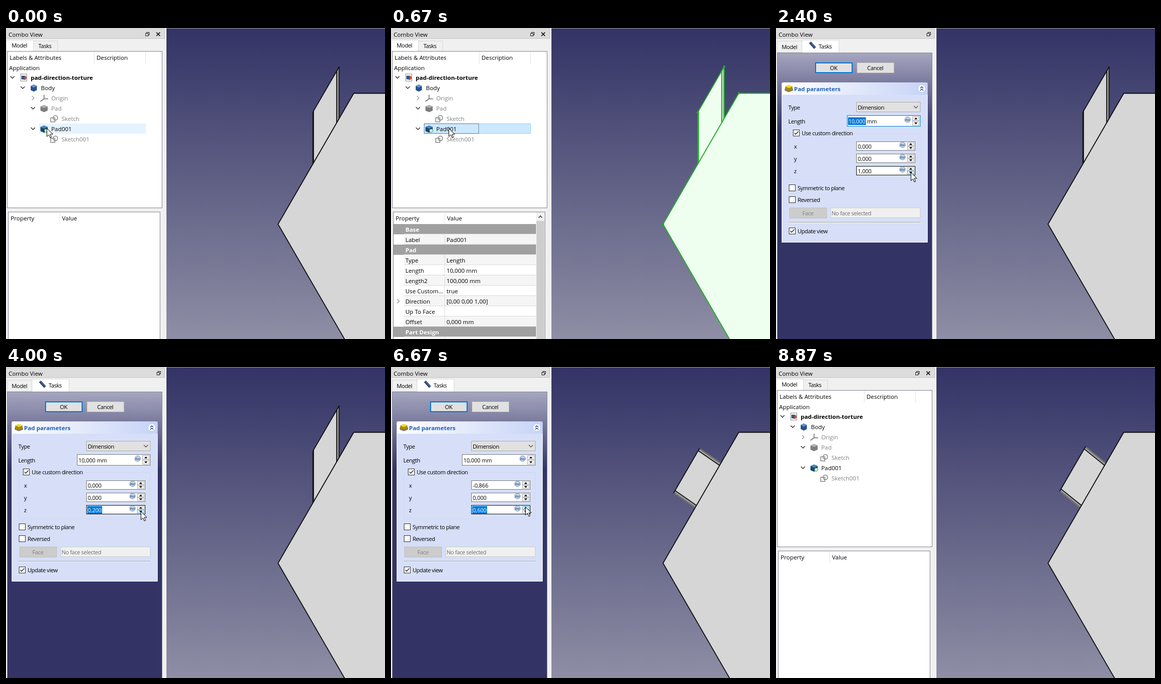
These frames come from a looping animation (737 by 606 pixels, 8.99 s). An HTML page with a canvas:

```html
<!DOCTYPE html>
<html lang="en">
<head>
<meta charset="utf-8">
<title>Pad direction</title>
<style>
html, body { margin: 0; width: 100%; height: 100%; overflow: hidden; background: #f0f0f0; }
canvas { display: block; }
</style>
</head>
<body>
<canvas id="stage" width="737" height="606"></canvas>
<script>
const c = document.getElementById('stage').getContext('2d');
const LOOP = 8990, BLUE = '#0078d7', GRAY = '#808080', PALE = '#d6dff7';
const UI = '11.4px "Open Sans", sans-serif', BOLD = 'bold ' + UI;
const SMALL = '11px "Open Sans", sans-serif', NUM = '10.6px "Open Sans", sans-serif';

// Moments when the picture changes
const SELECT = 470, EDIT = 800, STEP_DOWN = 2470, TILT = 4600, STEP_UP = 5600,
  RAISE = 6130, STEP_UP_2 = 6730, RAISE_2 = 7200, CLOSE = 8200, BLUR = 8870;

// ---------- Helpers ----------

function rect(x, y, w, h, fill) { c.fillStyle = fill; c.fillRect(x, y, w, h); }

function box(x, y, w, h, fill, border, width = 1) {
  rect(x, y, w, h, border);
  rect(x + width, y + width, w - 2 * width, h - 2 * width, fill);
}

function text(str, x, y, color = '#000', font = UI, align = 'left') {
  c.font = font;
  c.letterSpacing = font === SMALL ? '-0.45px' : '0px';
  c.textAlign = align;
  c.fillStyle = color;
  c.fillText(str, x, y);
}

const small = (str, x, y, color, align) => text(str, x, y, color, SMALL, align);

function trace(points, close) {
  c.beginPath();
  points.forEach(([x, y]) => c.lineTo(x, y));
  if (close) c.closePath();
}

function line(points, color = '#000', width = 1) {
  trace(points);
  c.strokeStyle = color;
  c.lineWidth = width;
  c.stroke();
}

function poly(points, fill) { trace(points, true); c.fillStyle = fill; c.fill(); }

function circle(x, y, r, fill, border, width = 1) {
  c.beginPath();
  c.arc(x, y, r, 0, 7);
  if (fill) { c.fillStyle = fill; c.fill(); }
  if (border) { c.strokeStyle = border; c.lineWidth = width; c.stroke(); }
}

function ramp(x0, y0, x1, y1, ...colors) {
  const g = c.createLinearGradient(x0, y0, x1, y1);
  colors.forEach((col, i) => g.addColorStop(i / (colors.length - 1), col));
  return g;
}

// Chevron pointing along (dx, dy)
function chevron(x, y, dx, dy, color, s = 4, width = 1.4) {
  const h = s / 2;
  line([[x - dx * h - dy * s, y - dy * h - dx * s], [x + dx * h, y + dy * h],
    [x - dx * h + dy * s, y - dy * h + dx * s]], color, width);
}

// Small isometric block
function block(x, y, r, h, side, top) {
  poly([[x - r, y - h], [x, y - h - 3], [x + r, y - h], [x + r, y + h], [x, y + h + 3], [x - r, y + h]], side);
  poly([[x - r, y - h], [x, y - h - 3], [x + r, y - h], [x, y - h + 3]], top);
}

// ---------- 3D view ----------

const HEX = { x: 823.5, y: 382.3, r: 294.5 };

function drawView(t) {
  rect(312, 0, 425, 1, '#a0a0a0');
  rect(312, 1, 425, 605, ramp(0, 1, 0, 606, '#333366', '#8e8ea5'));
  const picked = t >= SELECT && t < EDIT;
  const face = picked ? '#eefff0' : '#d6d6d6';
  const ink = picked ? '#1fae24' : '#101014';
  const tilted = t >= TILT;
  const z = t < RAISE ? 0.5 : t < RAISE_2 ? 0.6 : 0.7;

  // The pad keeps its height along the sketch normal, whatever the direction
  const dir = tilted ? [-0.866, -z] : [0, -1];
  const k = 50.5 / -(dir[0] * 0.866 + dir[1] * 0.5);
  const along = s => [HEX.x - HEX.r + s * 0.5, HEX.y - s * 0.866];
  const base = (tilted ? [226, 220, 130, 124] : [238, 228, 138, 135]).map(along);
  const top = base.map(([x, y]) => [x + dir[0] * k, y + dir[1] * k]);

  poly([...top, ...base.slice().reverse()], face);

  // Rounded sides, shaded across the extrusion
  const len = Math.hypot(...dir), n = [-dir[1] / len, dir[0] / len];
  for (const [inner, outer] of [[1, 0], [2, 3]]) {
    const [px, py] = base[inner], [qx, qy] = base[outer];
    const d = (qx - px) * n[0] + (qy - py) * n[1];
    poly([top[outer], top[inner], base[inner], base[outer]], ramp(px, py, px + n[0] * d, py + n[1] * d,
      ...(picked ? ['#d8f6d8', '#6cc06e'] : ['#c8c8c4', '#58585a'])));
    line([base[inner], top[inner]], ink, 1.8);
    if (!tilted) line([base[outer], top[outer]], ink, 1.4);
  }
  line([top[0], top[3]], ink, 1.8);

  const hex = Array.from({ length: 6 }, (_, i) => {
    const a = i * Math.PI / 3;
    return [HEX.x + HEX.r * Math.cos(a), HEX.y + HEX.r * Math.sin(a)];
  });
  poly(hex, face);
  line([...hex, hex[0]], ink, 1.8);
  if (picked) [hex[3], hex[4], top[0], top[3]].forEach(p => circle(...p, 2.2, ink));
}

// ---------- Title and tabs ----------

function drawFrame(tasks) {
  rect(0, 0, 312, 606, '#f0f0f0');
  box(-1, 1, 310, 20, '#dcdcdc', '#c4c4c4');
  text('Combo View', 5, 17);
  const x = tasks ? 293 : 271;
  box(x + 2, 8, 6, 6, '#dcdcdc', '#222');
  box(x, 10, 6, 6, '#dcdcdc', '#222');
  if (tasks) {
    box(2, 25, 49, 23, '#f0f0f0', '#d9d9d9');
    box(50, 23, 73, 26, '#fff', '#d9d9d9');
    line([[66, 28], [76, 39]], '#2c4676', 5);
    line([[67, 28], [77, 39]], '#6d8fc2', 1);
    small('Model', 11, 41);
    small('Tasks', 83, 40);
  } else {
    for (const d of [-3.5, 3.5]) line([[296 - d, 8.5], [296 + d, 15.5]], '#111', 1.7);
    box(53, 25, 48, 21, '#f0f0f0', '#d9d9d9');
    box(0, 23, 54, 24, '#fff', '#d9d9d9');
    small('Model', 11, 38);
    small('Tasks', 63, 39);
  }
}

// ---------- Model tab ----------

const ICONS = {
  page(x, y) {
    box(x - 6, y - 8, 13, 15, '#f4f4f4', '#999');
    circle(x + 2, y, 4, '#d0512c');
    rect(x - 4, y - 4, 6, 7, '#2f5790');
  },
  body(x, y) { block(x, y, 6, 4, '#28538c', '#6796cd'); },
  axes(x, y) {
    line([[x, y - 7], [x, y + 1], [x - 7, y + 6]], '#777', 1.6);
    line([[x, y + 1], [x + 8, y + 1]], '#777', 1.6);
  },
  pad(x, y) { block(x, y, 7, 4, '#7d7d7d', '#b0b0b0'); },
  tip(x, y) {
    block(x, y, 7, 4, '#1d4479', '#4f86c6');
    circle(x + 4, y + 3, 3.2, '#eafbe8', '#20b02c');
  },
  sketch(x, y) {
    c.strokeStyle = GRAY;
    c.lineWidth = 1.4;
    c.strokeRect(x - 7, y - 2, 8, 8);
    circle(x + 2, y - 2, 4.4, null, GRAY, 1.5);
  }
};

// Depth, icon, label, arrow
const TREE = [
  [0, 'page', 'pad-direction-torture', 'open'], [1, 'body', 'Body', 'open'],
  [2, 'axes', 'Origin', 'closed'], [2, 'pad', 'Pad', 'open'], [3, 'sketch', 'Sketch'],
  [2, 'tip', 'Pad001', 'open'], [3, 'sketch', 'Sketch001']
];

function drawTree(t) {
  const picked = t >= SELECT && t < EDIT;
  box(2, 45, 302, 306, '#fff', '#828790');
  text('Labels & Attributes', 7, 62);
  text('Description', 176, 62);
  for (const x of [171, 271]) rect(x, 46, 1, 24, '#e2e2e2');

  if (t < SELECT) rect(64, 186, 208, 20, '#e5f3ff');
  if (picked) box(64, 186, 208, 20, '#cce8ff', '#99d1ff');
  if (picked || (t >= CLOSE && t < BLUR)) {
    c.setLineDash([1, 1]);
    c.strokeStyle = '#222';
    c.lineWidth = 1;
    c.strokeRect(64.5, 186.5, 106, 19);
    c.setLineDash([]);
  }

  text('Application', 6, 82);
  TREE.forEach(([depth, icon, label, arrow], i) => {
    const x = 12 + 20 * depth, y = 97 + 20 * i;
    const live = !['Origin', 'Pad'].includes(label) && icon !== 'sketch';
    if (arrow === 'open') chevron(x + .5, y - 1, 0, 1, '#333');
    if (arrow === 'closed') chevron(x + .5, y - .5, 1, 0, '#999');
    ICONS[icon](x + 22, y);
    text(label, x + 36, y + 4, live ? '#000' : GRAY, depth ? UI : BOLD);
  });
}

const PROPERTIES = [['Base'], ['Label', 'Pad001'], ['Pad'], ['Type', 'Length'], ['Length', '10,000 mm'],
  ['Length2', '100,000 mm'], ['Use Custom...', 'true'], ['Direction', '[0,00 0,00 1,00]'],
  ['Up To Face', ''], ['Offset', '0,000 mm'], ['Part Design'], ['', '']];

function drawProperties(filled) {
  box(4, 358, 296, 260, '#fff', '#828790');
  text('Property', 9, 375);
  text('Value', 109, 375);
  rect(104, 360, 1, 22, '#e2e2e2');
  if (!filled) return;
  PROPERTIES.forEach(([name, value], i) => {
    const y = 382 + i * 20, group = value === undefined;
    if (group) rect(5, y, 277, 20, '#a0a0a0');
    else if (i % 2) rect(25, y, 257, 20, '#f5f5f5');
    rect(25, y + 19, 257, 1, '#dcdcdc');
    text(name, 28, y + 15, group ? '#fff' : '#000', group ? BOLD : UI);
    if (group) return;
    rect(104, y, 1, 20, '#dcdcdc');
    text(value, 108, y + 15);
  });
  chevron(14, 532.5, 1, 0, '#999');
  rect(282, 359, 17, 247, '#f0f0f0');
  rect(283, 376, 15, 230, '#cdcdcd');
  chevron(290.5, 368, 0, -1, '#444', 3.5, 1.6);
}

// ---------- Tasks tab ----------

function check(x, y, label, on) {
  box(x, y, 13, 13, '#fff', '#333');
  if (on) line([[x + 3, y + 6.5], [x + 5.5, y + 9], [x + 10.5, y + 3.5]], '#222', 1.3);
  small(label, x + 17, y + 11);
}

function spin(x, y, w, h, value, { border = '#7a7a7a', select = false, hot = 0 } = {}) {
  box(x, y, w, h, '#fff', border);
  const base = y + h / 2 + 5, right = x + w, mid = y + Math.floor(h / 2);
  const digits = value.split(' ')[0];
  text(value, x + 3, base, '#000', NUM);
  if (select) {
    rect(x + 2, base - 12, c.measureText(digits).width + 2, 15, BLUE);
    text(digits, x + 3, base, '#fff', NUM);
  }
  circle(right - 25, mid - 2.5, 5.5, '#c3d2e6', '#7f9abb');
  text('f(x)', right - 25, mid, '#34598c', 'italic bold 6px "Open Sans", sans-serif', 'center');
  const bh = mid - y - 2;
  for (const d of [-1, 1]) {
    const on = hot === d, by = d < 0 ? y + 2 : mid, cy = by + bh / 2;
    box(right - 16, by, 14, bh, on ? '#d9eefc' : '#f0f0f0', on ? '#5db0ea' : '#b5b5b5');
    poly([[right - 12, cy - d * 1.5], [right - 6, cy - d * 1.5], [right - 9, cy + d * 2]], '#000');
  }
}

const comma = v => v.toFixed(3).replace('.', ',');

function zValue(t) {
  if (t < STEP_DOWN) return 1;
  if (t < TILT) return Math.max(0, 9 - Math.floor((t - STEP_DOWN) / 200)) / 10;
  return t < STEP_UP ? 0.5 : t < STEP_UP_2 ? 0.6 : 0.7;
}

function button(x, y, w, label, fill, border, width, color) {
  box(x, y, w, 21, fill, border, width);
  small(label, x + w / 2 - .5, y + 15, color, 'center');
}

function drawTasks(t) {
  box(2, 48, 302, 570, ramp(0, 49, 0, 200, '#a6a6c0', '#333366'), '#828790');
  const hot = t >= 7500;
  button(76, 67, 73, 'OK', hot ? '#d8ebf9' : '#e1e1e1', BLUE, hot ? 1 : 2);
  button(157, 67, 73, 'Cancel', '#e1e1e1', '#adadad');

  c.beginPath();
  c.roundRect(11, 106, 284, 30, [3, 3, 0, 0]);
  c.fillStyle = ramp(11, 0, 295, 0, '#fff', '#c6d3f7');
  c.fill();
  box(11, 130, 284, 288, PALE, '#fff');
  rect(12, 130, 282, 1, PALE);
  block(25, 120, 8, 2, '#777', '#999');
  block(25, 117, 7, 3, '#a88a00', '#f4dc2c');
  text('Pad parameters', 35, 123, '#1f5fb8', BOLD);
  circle(283.5, 118, 7.5, '#fff', '#b4c3e4');
  for (const y of [116, 120.5]) chevron(283.5, y, 0, -1, '#1c3f80', 3);

  small('Type', 24, 159);
  box(156, 144, 125, 20, '#e1e1e1', '#adadad');
  small('Dimension', 159, 159);
  chevron(272, 154, 0, 1, '#444', 4, 1.1);

  const started = t >= STEP_DOWN;
  small('Length', 24, 186);
  spin(138, 170, 143, 22, '10,000 mm', { border: started ? '#7a7a7a' : BLUE, select: !started });

  c.strokeStyle = '#ced8ef';
  c.lineWidth = 1;
  c.strokeRect(25.5, 205.5, 255, 90);
  rect(31, 203, 120, 5, PALE);
  check(33, 198, 'Use custom direction', true);

  const over = t >= 2270 && t < 7000;
  const z = {
    border: over ? '#111' : started ? BLUE : '#7a7a7a',
    select: started && t < RAISE_2,
    hot: over ? (t < 5300 ? 1 : -1) : 0
  };
  const values = [t >= TILT ? -0.866 : 0, 0, zValue(t)];
  ['x', 'y', 'z'].forEach((axis, i) => {
    const y = 221 + 24 * i;
    small(axis, 35, y + 14);
    spin(156, y, 115, 18, comma(values[i]), axis === 'z' ? z : {});
  });

  check(25, 305, 'Symmetric to plane', false);
  check(25, 328, 'Reversed', false);
  button(26, 350, 73, 'Face', '#ccc', '#bfbfbf', 1, '#838383');
  box(106, 350, 175, 20, '#f0f0f0', '#ccc');
  small('No face selected', 108, 365, '#6d6d6d');
  rect(25, 378, 256, 1, '#a0a0a0');
  rect(25, 379, 256, 1, '#fff');
  check(25, 389, 'Update view', true);
}

// ---------- Cursor ----------

const START = [79, 195];
const HOPS = [
  { from: 70, to: 330, end: [112, 195], bulge: 22 },
  { from: 2130, to: 2330, end: [262, 281] },
  { from: 5070, to: 5400, end: [261, 272] },
  { from: 6870, to: 7530, end: [147, 88], bulge: -150 },
  { from: 7530, to: 7730, end: [124, 79] },
  { from: CLOSE, to: 8600, end: [-20, 150] }
];
const ORBIT = { from: 1270, to: 2130 };

const progress = (t, span) => Math.min(1, Math.max(0, (t - span.from) / (span.to - span.from)));

// One sweep around the direction fields
function orbit(u) {
  const a = -2.02 + u * 5.2, r = 0.82 + 0.18 * Math.sin(Math.PI * u);
  return [153 + 114 * r * Math.cos(a), 254 + 79 * r * Math.sin(a)];
}

function cursorAt(t) {
  let p = START;
  for (const hop of HOPS) {
    if (t < hop.from) break;
    if (hop.from === ORBIT.to) p = orbit(1);
    const u = progress(t, hop), e = u * u * (3 - 2 * u);
    p = p.map((v, i) => v + (hop.end[i] - v) * e);
    p[0] += (hop.bulge || 0) * Math.sin(Math.PI * u);
  }
  return t >= ORBIT.from && t < ORBIT.to ? orbit(progress(t, ORBIT)) : p;
}

function drawCursor(t) {
  const [x, y] = cursorAt(t);
  c.save();
  c.translate(Math.round(x) + .5, Math.round(y) + .5);
  const arrow = [[0, 0], [0, 16], [4, 12.5], [6.5, 18.5], [9, 17.5], [6.5, 11.5], [11.5, 11.5], [0, 0]];
  poly(arrow, '#fff');
  line(arrow);
  c.restore();
}

function draw(t) {
  const tasks = t >= EDIT && t < CLOSE;
  drawFrame(tasks);
  if (tasks) drawTasks(t);
  else {
    drawTree(t);
    drawProperties(t >= SELECT + 60 && t < EDIT);
  }
  drawView(t);
  drawCursor(t);
}

const start = performance.now();
function tick() {
  draw((performance.now() - start) % LOOP);
  requestAnimationFrame(tick);
}
tick();
</script>
</body>
</html>
```
